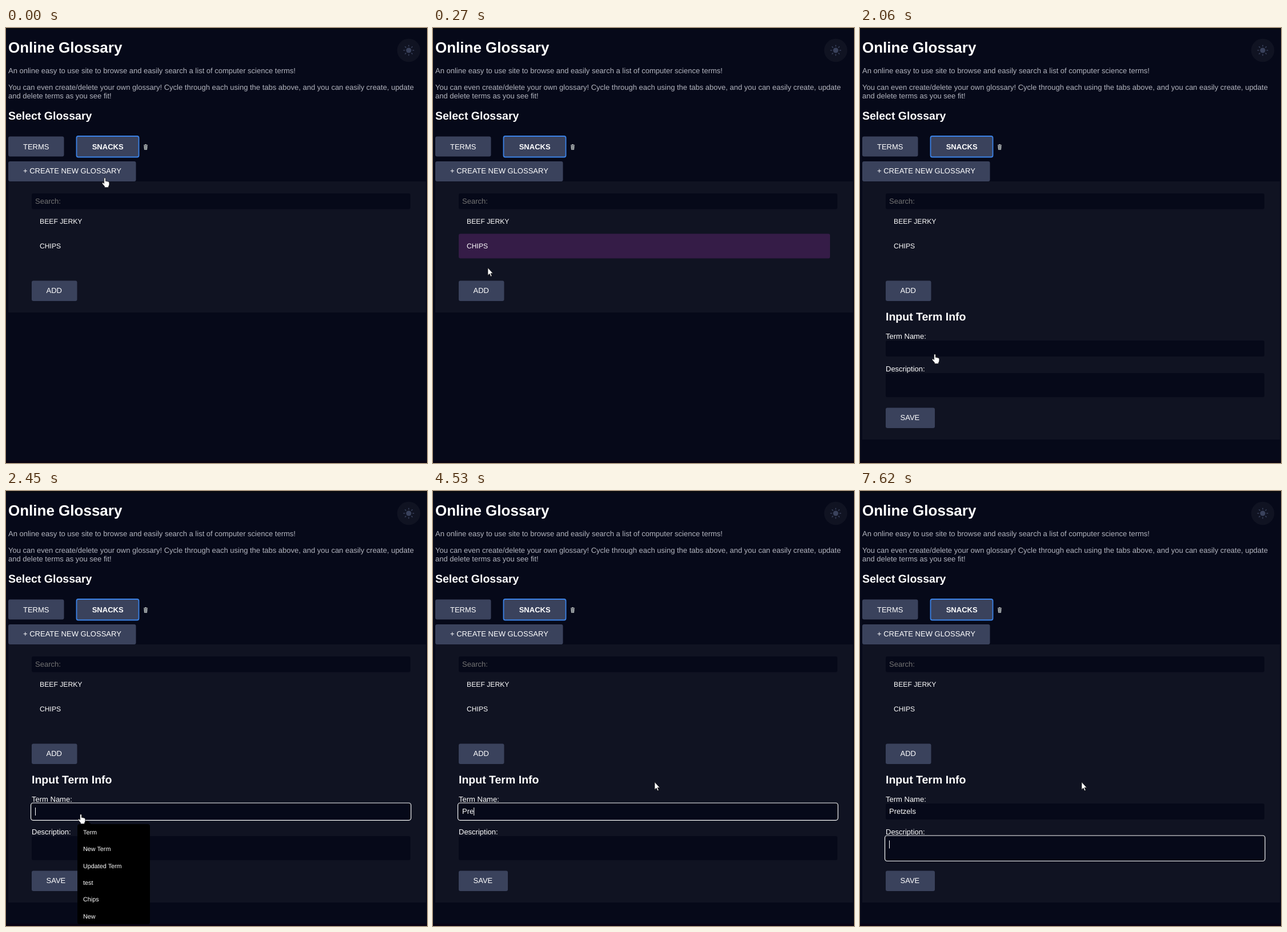
Animation, 737 px wide and 760 px high, one loop 8000 ms. Source, as an HTML page:

```html
<!DOCTYPE html>
<html lang="en">
<head>
<meta charset="utf-8">
<title>Online Glossary</title>
<style>
  html, body { margin: 0; width: 100%; height: 100%; overflow: hidden; background: #060919; }
  svg { display: block; font: 13px "Liberation Sans", Arial, sans-serif; fill: #fff; text-rendering: geometricPrecision; }
  .h1 { font-weight: bold; font-size: 26px; }
  .h2 { font-weight: bold; font-size: 19.5px; }
  .body { fill: #b2b4be; }
  .term { font-size: 12.19px; }
  .menu { font-size: 10.8px; }
  .button { fill: #3a425c; }
  .panel { fill: #101322; }
  .field { fill: #060919; }
  .focus { fill: none; stroke: #f4f4f4; stroke-width: 1.2; }
  .cursor { stroke: #111; stroke-width: .7; stroke-linejoin: round; }
</style>
</head>
<body>
<svg width="737" height="760" viewBox="0 0 737 760">
  <rect class="field" width="737" height="760"/>
  <rect width="737" height="3" fill="#090a10"/>
  <rect y="756" width="737" height="4" fill="#090313"/>

  <text class="h1" x="4" y="43">Online Glossary</text>
  <g class="body">
    <text x="4" y="79">An online easy to use site to browse and easily search a list of computer science terms!</text>
    <text x="4" y="108">You can even create/delete your own glossary! Cycle through each using the tabs above, and you can easily create, update</text>
    <text x="4" y="122.5">and delete terms as you see fit!</text>
  </g>
  <text class="h2" x="4" y="160">Select Glossary</text>

  <circle class="panel" cx="705" cy="39" r="20.3"/>
  <g class="button" transform="translate(705 39)">
    <circle r="4.6"/>
    <path id="rays" stroke="#3a425c" stroke-width="1.6" stroke-linecap="round"/>
  </g>

  <rect class="button" x="4" y="189.5" width="97.5" height="35" rx="3"/>
  <text x="30" y="211.5">TERMS</text>
  <rect class="button" x="123.5" y="189" width="109" height="36.5" rx="3" stroke="#3b82e6" stroke-width="1.8"/>
  <text x="150.7" y="211.5" font-weight="bold">SNACKS</text>
  <g fill="#c3c9c8">
    <path d="M241 204.3h7v1.3h-7zM243.3 203h2.4v1h-2.4zM241.4 206.2h6.2l-.6 6.6h-5z"/>
    <path d="M243.2 207v5M244.6 207v5M246 207v5" stroke="#39404a" stroke-width=".6"/>
  </g>
  <rect class="button" x="4" y="233" width="223.5" height="35" rx="3"/>
  <text x="30" y="254.3">+ CREATE NEW GLOSSARY</text>

  <rect class="panel" id="panel" x="4" y="268" width="731" height="229"/>
  <rect class="field" x="45" y="289" width="663" height="27.5" rx="3"/>
  <text x="51" y="306.5" fill="#737373">Search:</text>
  <rect id="hover" x="45" y="359.5" width="650" height="43" rx="3" fill="#351c47"/>
  <text class="term" x="59" y="342.3">BEEF JERKY</text>
  <text class="term" x="59" y="385.3">CHIPS</text>
  <rect class="button" x="45" y="441.5" width="79.5" height="35.5" rx="3"/>
  <text x="70.5" y="463.3">ADD</text>

  <g id="form">
    <text class="h2" x="45" y="510.5">Input Term Info</text>
    <text x="45" y="543">Term Name:</text>
    <rect class="field" x="45" y="546" width="663" height="28" rx="3"/>
    <text x="45" y="599.7">Description:</text>
    <rect class="field" x="45" y="603" width="663" height="42" rx="3"/>
    <rect class="button" x="45" y="663.5" width="86" height="35.5" rx="3"/>
    <text x="70.5" y="685.3">SAVE</text>
    <rect class="focus" id="nameFocus" x="43.5" y="545" width="665.5" height="30.3" rx="4"/>
    <rect class="focus" id="infoFocus" x="43.5" y="602" width="665.5" height="44.5" rx="4"/>
    <text id="name" x="51" y="564.3"></text>
    <path id="typo" d="M51 566.6H98.5" stroke="#d0161c" stroke-width="1.3" stroke-dasharray="2.4 1.4"/>
    <rect id="caret" width="1" height="14"/>
  </g>

  <g id="menu" class="menu">
    <path fill="#000" d="M129 582H135L142 576L149 582H248Q252 582 252 586V753Q252 757 248 757H129Q125 757 125 753V586Q125 582 129 582Z"/>
  </g>

  <path class="cursor" id="arrow" d="M0 0V13.2L3 10.4L5.1 15.2L7.1 14.3L5 9.7H9Z"/>
  <path class="cursor" id="hand" d="M3.6 1.6Q5 -.2 6.3 1.6V6.3L11 7.3Q12.8 7.9 12.8 9.5V12.5Q12.5 14.4 11.4 15.8V17.6H4.6V15.8L.8 11.3Q-.3 9.6 .9 9.1T3.6 10.8Z"/>
</svg>
<script>
const LOOP = 8000;
const $ = id => document.getElementById(id);
const show = (id, opacity) => $(id).setAttribute("opacity", Number(opacity));
const move = (id, x, y) => $(id).setAttribute("transform", `translate(${x} ${y})`);

// Each track lists [start time, value...]; a value holds until the next entry.
const at = (track, t) => track.findLast(step => step[0] <= t).slice(1);

const pointer = [
  [0, "hand", 168, 261], [150, "hand", 130, 368], [270, "arrow", 96, 419],
  [420, "hand", 88, 453], [550, "hand", 83, 461], [1700, "hand", 87, 469],
  [1820, "arrow", 103, 500], [1940, "arrow", 119, 537], [2060, "hand", 126, 569],
  [2210, "hand", 126, 564], [2600, "hand", 230, 548], [2720, "arrow", 355, 511],
  [2870, "arrow", 388, 508.5]
];
const typing = [
  [0, ""], [4380, "P"], [4530, "Pre"], [5060, "Pret"], [5340, "Pretz"], [5470, "Pretzl"],
  [5610, "Pretzle"], [5740, "Pretzles"], [6880, "Pretzle"], [7030, "Pretzl"],
  [7190, "Pretze"], [7330, "Pretzel"], [7460, "Pretzels"]
];
const blink = [[0, 0], [2210, 1], [2720, 0], [3250, 1], [3830, 0], [4230, 1], [6320, 0], [6730, 1]];
const menuFade = [[0, 0], [2210, .3], [2330, .7], [2450, 1], [4380, .4], [4530, 0]];

$("rays").setAttribute("d", Array.from({ length: 8 }, (_, i) => {
  const c = Math.cos(i * Math.PI / 4), s = Math.sin(i * Math.PI / 4);
  return `M${7.2 * c} ${7.2 * s}L${8.8 * c} ${8.8 * s}`;
}).join(""));

["Term", "New Term", "Updated Term", "test", "Chips", "New"].forEach((label, i) =>
  $("menu").insertAdjacentHTML("beforeend", `<text x="135" y="${600 + i * 29.3}">${label}</text>`));

function draw(t) {
  const [kind, x, y] = at(pointer, t);
  for (const id of ["arrow", "hand"]) show(id, id === kind);
  move(kind, x, y);

  show("hover", t >= 150 && t < 420);
  show("form", t >= 1420);
  $("panel").setAttribute("height", t < 1420 ? 229 : 451);

  const inInfo = t >= 7620;
  show("nameFocus", t >= 2210 && !inInfo);
  show("infoFocus", inInfo);
  show("typo", t >= 6730 && t < 6880);
  show("menu", at(menuFade, t)[0]);

  const [text] = at(typing, t);
  $("name").textContent = text;
  show("caret", at(blink, t)[0]);
  if (inInfo) move("caret", 51, 610.5);
  else move("caret", 51 + (text && $("name").getComputedTextLength()), 553);
}

function frame() {
  draw(performance.now() % LOOP);
  requestAnimationFrame(frame);
}
frame();
</script>
</body>
</html>
```
